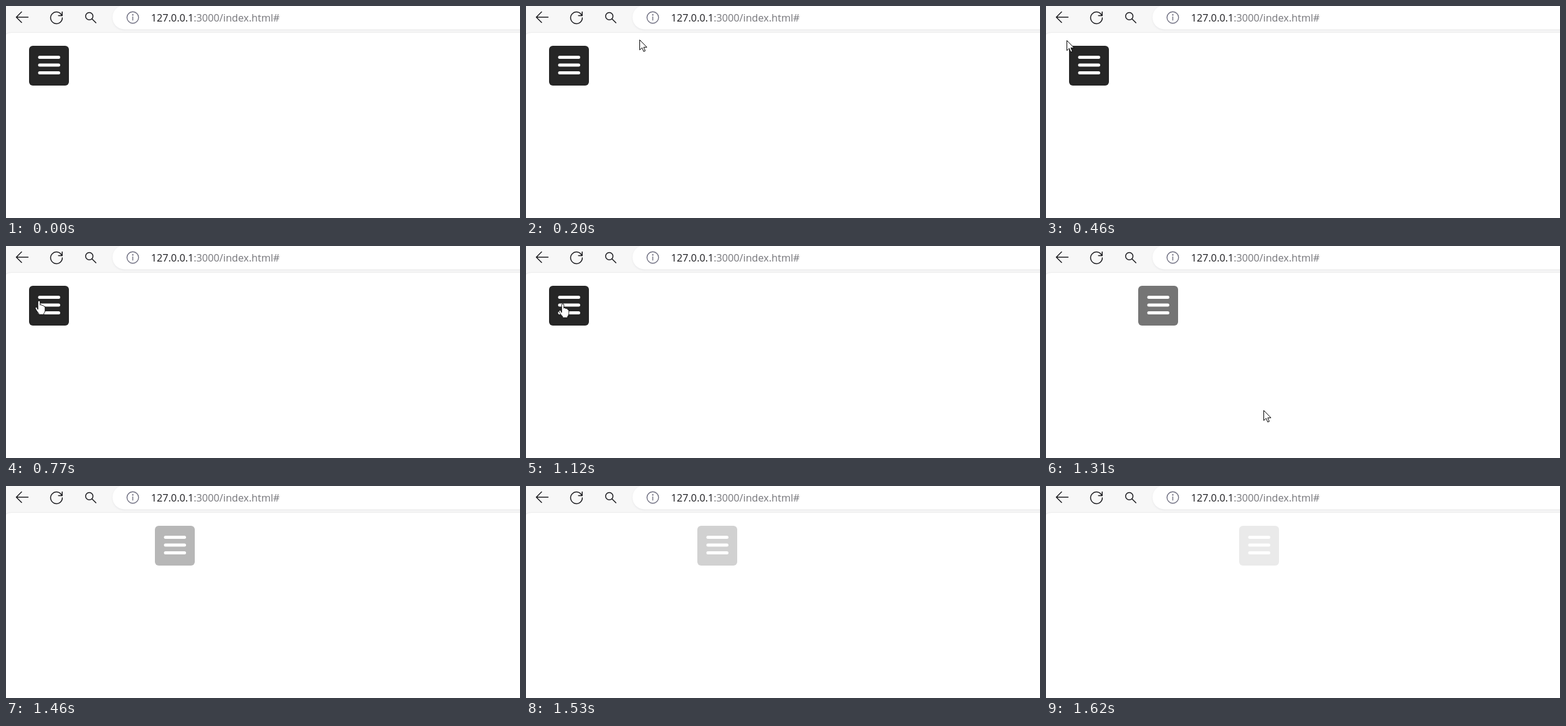
An HTML page for the animation above (2510 ms loop, 825 by 341 pixels).

```html
<!DOCTYPE html>
<html lang="en">
<head>
<meta charset="utf-8">
<title>Sliding menu button</title>
<style>
  html, body { margin: 0; width: 100%; height: 100%; overflow: hidden; background: #fff; }
  svg { display: block; width: 825px; height: 341px; }
  text { font: 16.2px "Open Sans", "Noto Sans", sans-serif; }
  .icon { fill: none; stroke: #1b1b1f; stroke-width: 1.5; stroke-linecap: round; stroke-linejoin: round; }
  .info { fill: none; stroke: #6e6e80; stroke-width: 1.4; stroke-linecap: round; }
  .pointer { fill: #fff; stroke: #000; stroke-linejoin: round; }
</style>
</head>
<body>
<svg viewBox="0 0 825 341">
  <defs>
    <filter id="soft" x="-5%" y="-30%" width="110%" height="160%">
      <feGaussianBlur stdDeviation="1.5"/>
    </filter>
  </defs>

  <rect width="825" height="341" fill="#f7f7f7"/>
  <rect x="171" y="0" width="700" height="39" rx="19" fill="#e8e8ea" filter="url(#soft)"/>
  <rect x="171" y="-1" width="700" height="38.5" rx="19" fill="#fff"/>
  <path d="M-1 46Q3 42.5 9 42.5H826V342H-1Z" fill="#fff" stroke="#ebebeb"/>

  <g class="icon">
    <path d="M35.5 18H16.5M25 9.5L16.5 18L25 26.5"/>
    <path d="M89.6 15.2A9.4 9.4 0 1 0 90.4 19M90.2 9.5V15.5H84.2"/>
    <circle cx="133.7" cy="16.4" r="5.9"/>
    <path d="M138 20.7L144.3 27"/>
  </g>
  <g class="info">
    <circle cx="203.5" cy="18.5" r="9.3"/>
    <path d="M203.5 17.5V22.8"/>
    <circle cx="203.5" cy="14.3" r=".5"/>
  </g>
  <text x="232.8" y="24.8" fill="#1b1b1f">127.0.0.1<tspan fill="#75757a">:3000/index.html#</tspan></text>

  <g id="button">
    <rect x="37" y="64" width="64" height="64" rx="6" fill="#262626"/>
    <path d="M54 82.5H84.5M54 95H84.5M54 107.5H84.5" stroke="#fff" stroke-width="5" stroke-linecap="round"/>
  </g>

  <path id="arrow" class="pointer" d="M.5 .5V16.7L4.3 13.2L6.9 19.2L9.4 18.1L6.9 12.3H12Z"/>
  <path id="hand" class="pointer" stroke-width=".9" d="M-1.8 14V1.8Q-1.8 0 0 0T1.8 1.8V7.2Q2.2 6.3 3.4 6.5Q4.8 6.7 4.9 8Q5.6 7.3 6.6 7.6Q7.8 8 7.9 9.2Q9.8 8.8 9.8 11V15.5Q9.8 18.5 7.8 20.3V22.3H-.3V20.3Q-2.8 18.2-4.2 15.6L-6 12.2Q-6.3 10.4-4.7 10.3Q-3.8 10.3-3.1 11.5Z"/>
</svg>
<script>
  const LOOP = 2510;
  const FREEZE = 1620; // the recording stops updating before the slide ends
  const SLIDE = { start: 1163, length: 605, distance: 300 };
  const BUTTON = { x: 37, y: 64, size: 64 };

  // pointer moves; bow lifts the middle of the path
  const MOVES = [
    { start: 20, end: 460, from: { x: 464, y: 282 }, to: { x: 33, y: 55 }, bow: 88 },
    { start: 560, end: 770, from: { x: 33, y: 55 }, to: { x: 53, y: 88 }, bow: 0 },
    { start: 870, end: 1070, from: { x: 53, y: 88 }, to: { x: 59, y: 93 }, bow: 0 },
    { start: 1160, end: 1460, from: { x: 59, y: 93 }, to: { x: 446, y: 341 }, bow: 20 }
  ];

  const button = document.getElementById("button");
  const arrow = document.getElementById("arrow");
  const hand = document.getElementById("hand");

  const clamp = v => Math.min(1, Math.max(0, v));
  const mix = (a, b, k) => a + (b - a) * k;
  const bezier = (a, b, s) => 3 * a * s * (1 - s) ** 2 + 3 * b * s * s * (1 - s) + s ** 3;

  // cubic-bezier(0, 0, .58, 1)
  function easeOut(p) {
    let low = 0, high = 1;
    for (let i = 0; i < 24; i++) {
      const mid = (low + high) / 2;
      if (bezier(0, 0.58, mid) < p) low = mid;
      else high = mid;
    }
    return bezier(0, 1, low);
  }

  function recorded(t) {
    if (t >= 1310 && t < 1410) return 1310;
    if (t >= 1460 && t < 1500) return 1460;
    return Math.min(t, FREEZE);
  }

  function pointerAt(t) {
    const move = MOVES.filter(m => m.start <= t).pop();
    if (!move) return null;
    const { start, end, from, to, bow } = move;
    const k = 1 - (1 - clamp((t - start) / (end - start))) ** 2;
    return {
      x: Math.round(mix(from.x, to.x, k)),
      y: Math.round(mix(from.y, to.y, k) - 4 * bow * k * (1 - k))
    };
  }

  function place(node, pos, visible) {
    node.style.display = visible ? "" : "none";
    if (visible) node.setAttribute("transform", `translate(${pos.x} ${pos.y})`);
  }

  function draw(time) {
    const t = recorded(time);
    const progress = easeOut(clamp((t - SLIDE.start) / SLIDE.length));
    const shift = Math.round(SLIDE.distance * progress);
    button.setAttribute("transform", `translate(${shift})`);
    button.setAttribute("opacity", 1 - progress);

    const pos = pointerAt(t);
    const inside = (v, start) => v >= start && v < start + BUTTON.size;
    const over = pos && inside(pos.x, BUTTON.x + shift) && inside(pos.y, BUTTON.y);
    place(hand, pos, pos && over);
    place(arrow, pos, pos && !over);
  }

  const begin = performance.now();
  function tick() {
    draw((performance.now() - begin) % LOOP);
    requestAnimationFrame(tick);
  }
  tick();
</script>
</body>
</html>
```
